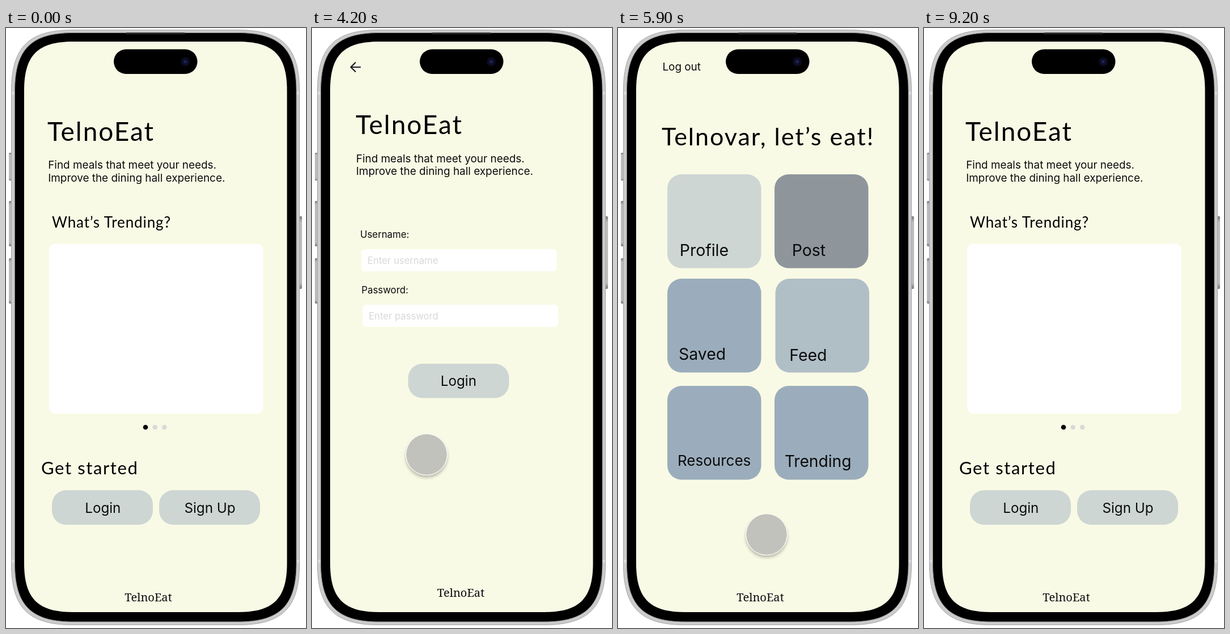
Recreate the animation shown at these times as an HTML page. Size 529x1058 px, loop 10 s.

```html
<!DOCTYPE html>
<html lang="en">
<head>
<meta charset="utf-8">
<title>Dining app walkthrough</title>
<style>
  html, body { margin: 0; width: 100%; height: 100%; overflow: hidden; background: #fff; }
  #stage { position: relative; width: 529px; height: 1058px; overflow: hidden; }
  svg { position: absolute; left: 0; top: 0; display: block; }
  text { font-family: Inter, sans-serif; fill: #0b0b0b; }
  .hand { font-family: Lato, sans-serif; fill: #000; }
  .brand { font-size: 46px; letter-spacing: 2px; }
  .serif { font-family: "Noto Serif", serif; font-size: 20px; text-anchor: middle; }
  .mid { text-anchor: middle; font-size: 24.2px; }
  .body { font-size: 18.9px; }
  .label { font-size: 16.8px; }
  .hint { font-size: 16.7px; fill: #d9d9d9; }
  .screen { visibility: hidden; }
  #touch {
    position: absolute; left: -37.5px; top: -37.5px; width: 72.6px; height: 72.6px;
    border: 1.2px solid #fff; border-radius: 50%;
    background: rgba(176, 175, 175, .75); background-clip: padding-box;
    box-shadow: 0 4px 5px rgba(0, 0, 0, .25);
  }
  #arrow { width: 26px; height: 36px; overflow: visible; }
</style>
</head>
<body>
<div id="stage">
  <svg width="529" height="1058" viewBox="0 0 529 1058">
    <defs>
      <linearGradient id="key" x2="0" y2="1">
        <stop offset="0" stop-color="#777"/>
        <stop offset=".08" stop-color="#bdbdbd"/>
        <stop offset=".92" stop-color="#bdbdbd"/>
        <stop offset="1" stop-color="#777"/>
      </linearGradient>
      <radialGradient id="lens">
        <stop offset="0" stop-color="#1b1d50"/>
        <stop offset=".5" stop-color="#0d0f2a"/>
        <stop offset="1" stop-color="#05060f"/>
      </radialGradient>
    </defs>

    <g fill="url(#key)">
      <rect x="5" y="220" width="6" height="49" rx="2"/>
      <rect x="5" y="305" width="6" height="80" rx="2"/>
      <rect x="5" y="406" width="6" height="80" rx="2"/>
      <rect x="516" y="332" width="6" height="128" rx="2"/>
    </g>
    <path id="body" fill="#cbcbcb" stroke="#a6a6a6"/>
    <path d="M10 115h5M512 115h5M10 940h5M512 940h5" stroke="#dcdcdc" stroke-width="5"/>
    <path id="bezel" stroke="#858585"/>
    <path d="M213 9.5h101" stroke="#2b2b2b" stroke-width="3" stroke-linecap="round"/>
    <path id="glass" fill="#f9fae5"/>

    <g class="screen" id="home">
      <text class="hand brand" x="73" y="199">TelnoEat</text>
      <text class="body" x="74.2" y="248.3">Find meals that meet your needs.</text>
      <text class="body" x="74.2" y="271">Improve the dining hall experience.</text>
      <text class="hand" x="81" y="352" font-size="26" letter-spacing=".9">What’s Trending?</text>
      <rect x="76" y="380.5" width="377.5" height="299.5" rx="11" fill="#fff"/>
      <circle cx="246" cy="704" r="4.3"/>
      <circle cx="262.7" cy="704" r="4.3" fill="#d9d9d9"/>
      <circle cx="279.3" cy="704" r="4.3" fill="#d9d9d9"/>
      <text class="hand" x="62" y="787" font-size="31" letter-spacing="1.6">Get started</text>
      <g fill="#cdd6d3">
        <rect x="81" y="815" width="178" height="61" rx="25"/>
        <rect x="270" y="815" width="178" height="61" rx="25"/>
      </g>
      <text class="mid" x="170.8" y="854.5">Login</text>
      <text class="mid" x="359.5" y="854.5">Sign Up</text>
      <text class="serif" x="251" y="1011">TelnoEat</text>
    </g>

    <g class="screen" id="login">
      <path d="M86 69H69M77 60.5L68.5 69L77 77.5" fill="none" stroke="#1d1b20" stroke-width="2.2"/>
      <text class="hand brand" x="77" y="187">TelnoEat</text>
      <text class="body" x="77.8" y="236.5">Find meals that meet your needs.</text>
      <text class="body" x="77.8" y="259.3">Improve the dining hall experience.</text>
      <text class="label" x="85" y="370">Username:</text>
      <rect x="87" y="390" width="344.5" height="39" rx="6" fill="#fff"/>
      <text class="hint" x="98" y="415.5">Enter username</text>
      <text class="label" x="87.3" y="468">Password:</text>
      <rect x="89.5" y="488" width="344.5" height="39" rx="6" fill="#fff"/>
      <text class="hint" x="100" y="513.5">Enter password</text>
      <rect x="169.5" y="592" width="178" height="60.5" rx="25" fill="#cdd6d3"/>
      <text class="mid" x="258.4" y="631">Login</text>
      <text class="serif" x="262.5" y="1003">TelnoEat</text>
    </g>

    <g class="screen" id="menu">
      <text class="body" x="78.4" y="74.5">Log out</text>
      <text class="hand" x="77" y="207" font-size="43" letter-spacing="2">Telnovar, let’s eat!</text>
      <g id="tiles"></g>
      <text class="serif" x="251" y="1011">TelnoEat</text>
    </g>

    <rect x="190" y="37.5" width="147.5" height="43.5" rx="21.7"/>
    <circle cx="316" cy="59.5" r="8.5" fill="url(#lens)"/>
    <circle cx="316" cy="59.5" r="1.8" fill="#262a66"/>
  </svg>

  <div id="touch"></div>
  <svg id="arrow" viewBox="0 0 26 36">
    <path d="M.5 .5V29L7 23L11.5 32L15.5 30L11.5 21.2H21Z" fill="#fff" stroke="#22222a" stroke-width="1.1"/>
  </svg>
</div>

<script>
const LOOP = 10000, STEP = 100;
const $ = id => document.getElementById(id);

// Rounded box with continuous-curvature corners of extent e
function squircle(l, t, r, b, e) {
  const c = e * .72, q = e - c;
  return `M${l + e} ${t}H${r - e}c${c} 0 ${e} ${q} ${e} ${e}V${b - e}` +
    `c0 ${c} ${-q} ${e} ${-e} ${e}H${l + e}c${-c} 0 ${-e} ${-q} ${-e} ${-e}` +
    `V${t + e}c0 ${-c} ${q} ${-e} ${e} ${-e}Z`;
}
$("body").setAttribute("d", squircle(9.5, 3.5, 517.5, 1052.5, 108));
$("bezel").setAttribute("d", squircle(15.5, 8.5, 512, 1047, 103));
$("glass").setAttribute("d", squircle(32, 24, 495.5, 1030, 86));

// [label, tile x, tile y, text x, baseline, fill, font size]
const tiles = [
  ["Profile", 87, 258, 108.8, 402, "#cdd6d3", 28.4],
  ["Post", 276, 258, 306.8, 402, "#8e969c", 28.4],
  ["Saved", 87, 442, 107, 585, "#9badbc", 28.4],
  ["Feed", 277.5, 442, 302.3, 587, "#b0bec6", 28.4],
  ["Resources", 87, 631, 105, 771.5, "#9badbc", 26],
  ["Trending", 276, 631, 293.7, 774, "#9badbc", 28.2]
];
$("tiles").innerHTML = tiles.map(([name, x, y, tx, ty, fill, size]) =>
  `<rect x="${x}" y="${y}" width="165.5" height="165.5" rx="25" fill="${fill}"/>` +
  `<text x="${tx}" y="${ty}" font-size="${size}">${name}</text>`).join("");

const screens = [[0, "home"], [2400, "login"], [4700, "menu"], [8400, "home"]];

// [time, x, y]; a pointer is shown from its first key until its last
const touchPath = [
  [100, 545, 330], [500, 350, 560], [1100, 200, 790], [1500, 162, 848],
  [2800, 162, 848], [3400, 173, 870], [3900, 173, 870], [4000, 174, 857],
  [4100, 174, 857], [4200, 202, 752], [4500, 222, 632], [5000, 220, 630],
  [5300, 271, 709.5], [5500, 288, 800], [5700, 275, 870], [5900, 262, 893],
  [6400, 262, 893], [6600, 315, 780], [6900, 490, 361], [7000, 525, 350], [7100, 570, 350]
];
const arrowPath = [
  [7400, 505, 330], [7700, 330, 190], [8000, 135, 95], [8200, 109, 79.5],
  [8600, 109, 79.5], [8700, 90, 84], [8800, 120, 76], [9000, 300, 40],
  [9100, 424, 16], [9200, 470, -40]
];

function place(el, path, t) {
  const on = t >= path[0][0] && t < path.at(-1)[0];
  el.style.visibility = on ? "visible" : "hidden";
  if (!on) return;
  const i = path.findIndex(k => k[0] > t);
  const [t0, x0, y0] = path[i - 1], [t1, x1, y1] = path[i];
  const p = (t - t0) / (t1 - t0);
  el.style.transform = `translate(${x0 + (x1 - x0) * p}px, ${y0 + (y1 - y0) * p}px)`;
}

function draw(now) {
  const t = Math.floor((now % LOOP) / STEP) * STEP;
  const current = screens.filter(s => s[0] <= t).pop()[1];
  for (const id of ["home", "login", "menu"])
    $(id).style.visibility = id === current ? "visible" : "hidden";
  place($("touch"), touchPath, t);
  place($("arrow"), arrowPath, t);
}

const start = performance.now();
function tick() {
  draw(performance.now() - start);
  requestAnimationFrame(tick);
}
tick();
</script>
</body>
</html>
```
